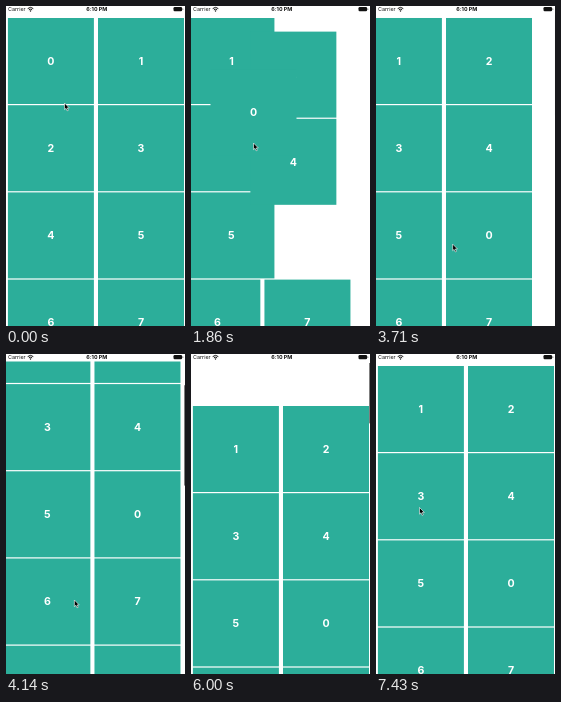
An HTML page that plays this animation: 179 px wide and 320 px high, repeating every 8000 ms.

```html
<!DOCTYPE html>
<html lang="en">
<head>
<meta charset="utf-8">
<title>Reorderable grid</title>
<style>
  html, body { margin: 0; width: 100%; height: 100%; overflow: hidden; background: #fff; }
  svg { display: block; width: 100vw; height: 100vh; }
  text { font-family: Inter, "Liberation Sans", sans-serif; }
  .cell rect { fill: #2cae9a; }
  .cell text { fill: #fff; font-size: 10.6px; font-weight: 700; text-anchor: middle; }
  .bar text { font-size: 5.4px; fill: #111; }
  .bar .clock { font-weight: 700; text-anchor: middle; }
</style>
</head>
<body>
<svg viewBox="0 0 179 320">
  <defs><clipPath id="view"><rect y="7.6" width="179" height="313"/></clipPath></defs>
  <g clip-path="url(#view)">
    <g id="grid"></g>
    <rect id="thumb" x="178" width="1" fill="#000" fill-opacity=".5"/>
  </g>
  <g class="bar">
    <text x="2" y="5.1">Carrier</text>
    <g fill="none" stroke="#111">
      <path d="M21.7 2.6Q24.5 .1 27.3 2.6"/>
      <path d="M22.9 3.9Q24.5 2.5 26.1 3.9"/>
    </g>
    <circle cx="24.5" cy="5" r=".7" fill="#111"/>
    <text class="clock" x="90.8" y="5.1">6:10 PM</text>
    <rect x="167.5" y="1.1" width="8.6" height="4.2" rx="1.2" fill="#111"/>
    <rect x="176.5" y="2.4" width=".8" height="1.6" rx=".4" fill="#555"/>
  </g>
  <path id="cursor" d="M0 0V6.6L1.5 5.3L2.6 7.8L3.8 7.3L2.7 4.9H4.8Z"
        fill="#000" stroke="#fff" stroke-width=".6" stroke-linejoin="round"/>
</svg>
<script>
  const LOOP = 8, FPS = 7;                        // seconds, pictures per second
  const SIZE = 86, PITCH = 87.2, TOP = 55, COUNT = 22;
  const VIEW = 312, CONTENT = 970, GRIP = 31;     // GRIP: pointer below the cell's centre
  const LIFT = 10 / 7, DROP = 22 / 7;

  // Pointer stops: [seconds, x, y]
  const stops = [
    [0, 58.5, 97], [.14, 51, 95], [.57, 57, 86], [.86, 52, 74], [1.14, 46, 86], [1.43, 46, 86],
    [1.857, 62.5, 137], [2.43, 66, 182], [2.571, 92, 220.5], [2.86, 112, 234], [3.57, 80, 226],
    [4, 70, 262], [4.71, 62, 182.5], [5.29, 60, 186], [5.86, 60, 380], [6.6, 60, 340], [7.42, 43.5, 153.5]
  ];

  const mix = (a, b, u) => a + (b - a) * u;
  const mixPoint = (a, b, u) => [mix(a[0], b[0], u), mix(a[1], b[1], u)];
  const ramp = (t, a, b) => Math.min(1, Math.max(0, (t - a) / (b - a)));
  const smooth = (t, a, b) => { const u = ramp(t, a, b); return u * u * (3 - 2 * u); };
  const settle = (t, a, b) => 1 - (1 - ramp(t, a, b)) ** 2;

  function pointer(t) {
    const i = Math.max(0, stops.findLastIndex(s => s[0] <= t));
    const a = stops[i], b = stops[i + 1] || a;
    return mixPoint(a.slice(1), b.slice(1), a === b ? 0 : ramp(t, a[0], b[0]));
  }

  const slot = i => [i % 2 ? 135 : 44.9, TOP + Math.floor(i / 2) * PITCH];
  const el = id => document.getElementById(id);
  const place = (node, [x, y]) => node.setAttribute("transform", `translate(${x.toFixed(2)} ${y.toFixed(2)})`);

  function makeCell(n) {
    const g = document.createElementNS("http://www.w3.org/2000/svg", "g");
    g.setAttribute("class", "cell");
    g.innerHTML = `<rect x="${-SIZE / 2}" y="${-SIZE / 2}" width="${SIZE}" height="${SIZE}"/><text y="3.8">${n}</text>`;
    return g;
  }
  const cells = Array.from({ length: COUNT }, (_, n) => makeCell(n));
  // Odd cells lie beneath even ones, the dragged cell on top.
  const layer = n => n === 0 ? 2 : 1 - n % 2;
  [...cells.keys()].sort((a, b) => layer(a) - layer(b)).forEach(n => el("grid").append(cells[n]));

  function draw(t) {
    const reorder = smooth(t, LIFT, 2);
    const dx = -22 * (reorder - smooth(t, 3.71, 4.29));
    const sy = 172.8 * smooth(t, 3.71, 4.71) - 212.8 * smooth(t, 5.29, 6) + 40 * settle(t, 6.29, 7);
    const scrolled = ([x, y]) => [x + dx, y - sy];
    const hand = pointer(t);

    cells.forEach((cell, n) => {
      const moved = n > 0 && n < 6 ? n - 1 : n;
      place(cell, scrolled(mixPoint(slot(n), slot(moved), reorder)));
    });
    if (t >= LIFT) {
      const held = [hand[0], hand[1] - GRIP * (1 - smooth(t, 1.857, 2.5))];
      place(cells[0], mixPoint(held, scrolled(slot(5)), smooth(t, 2.8, DROP)));
    }

    const thumb = el("thumb");
    thumb.setAttribute("y", 9 + Math.max(0, sy) * VIEW / CONTENT);
    thumb.setAttribute("height", VIEW * VIEW / CONTENT + Math.min(0, sy));
    thumb.setAttribute("opacity", ramp(t, 3.71, 3.86) - ramp(t, 7, 7.3));
    place(el("cursor"), hand);
  }

  const start = performance.now();
  function loop() {
    const t = (performance.now() - start) / 1000 % LOOP;
    draw(Math.floor((t + .005) * FPS) % (LOOP * FPS) / FPS);
    requestAnimationFrame(loop);
  }
  loop();
</script>
</body>
</html>
```
